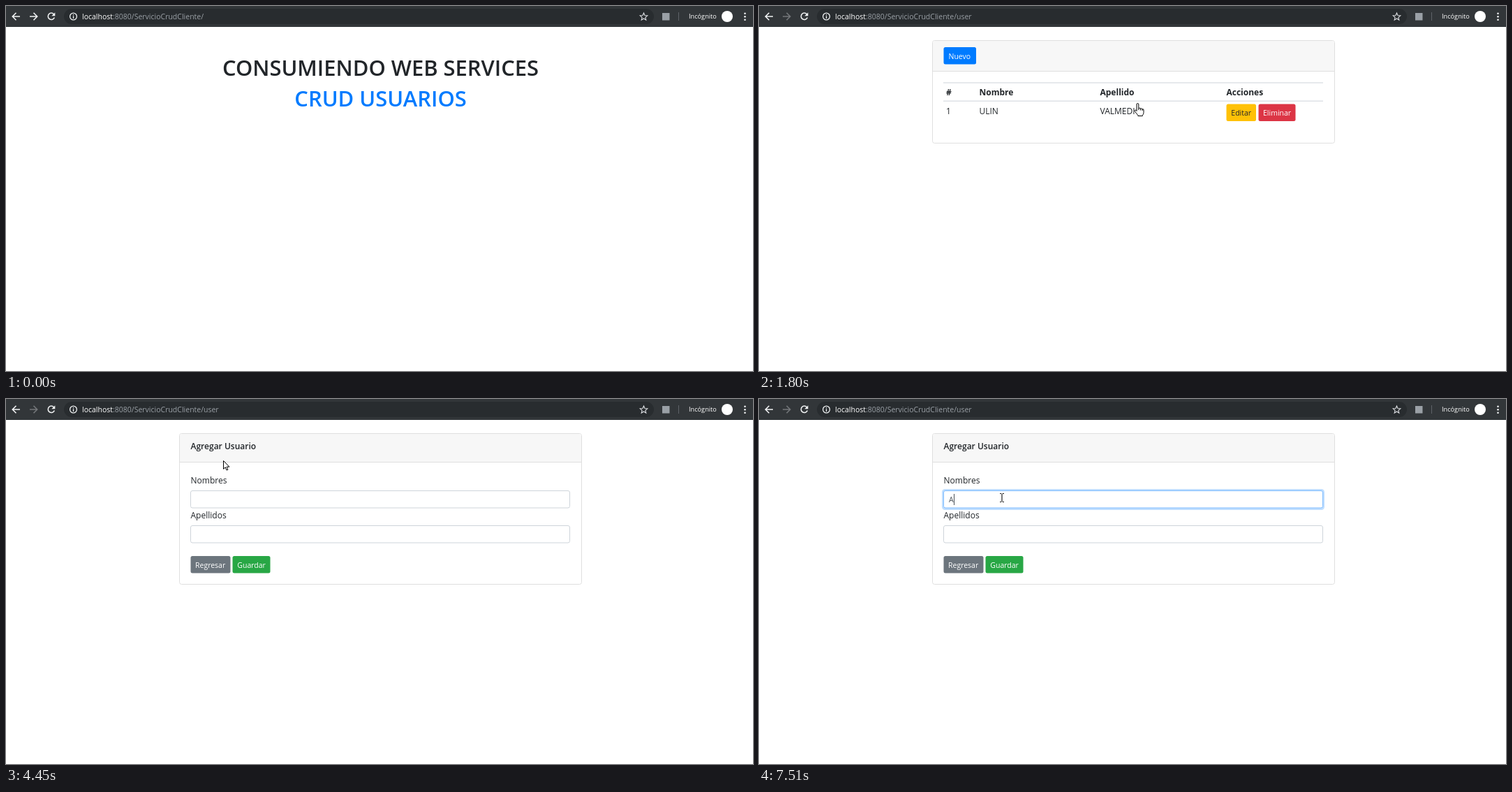
Recreate the animation shown at these times as an HTML page. Size 1070x523 px, loop 7990 ms.

```html
<!DOCTYPE html>
<html lang="es">
<head>
<meta charset="utf-8">
<title>CRUD Usuarios</title>
<style>
html, body { margin: 0; width: 100%; height: 100%; overflow: hidden; background: #fff; }
svg { display: block; width: 1070px; height: 523px; font: 12px "Open Sans", "Noto Sans", sans-serif; fill: #212529; }
.small { font-size: 10.5px; }
.h1 { font-size: 30.9px; font-weight: 600; text-anchor: middle; }
.bold { font-weight: 700; }
.white { fill: #fff; }
.icon { fill: none; stroke: #f1f3f4; stroke-width: 1.6; }
.card { fill: #fff; stroke: #dfdfdf; }
.input { fill: #fff; stroke: #ced4da; }
.cursor { fill: #fff; stroke: #000; stroke-linejoin: round; }
#link.hover { fill: #0056b3; text-decoration: underline; }
</style>
</head>
<body>
<svg viewBox="0 0 1070 523">
  <g id="home">
    <text class="h1" x="536.5" y="100">CONSUMIENDO WEB SERVICES</text>
    <text class="h1" id="link" x="536.5" y="144" fill="#007bff">CRUD USUARIOS</text>
  </g>

  <g id="list">
    <rect class="card" x="248.5" y="49.5" width="576" height="147" rx="3"/>
    <path d="M249 93V52q0-2 2-2H822q2 0 2 2V93z" fill="#f7f7f7"/>
    <path d="M249 93.5H824" stroke="#dfdfdf"/>
    <rect id="newBtn" x="264.5" y="59" width="46.5" height="24.5" rx="2.5"/>
    <text class="small white" x="271.5" y="76">Nuevo</text>
    <rect id="row" x="264" y="136" width="544" height="32" fill="#ececec"/>
    <path d="M264 110H808M264 136.3H808" stroke="#dee2e6" stroke-width="1.4"/>
    <g class="bold">
      <text x="268" y="128">#</text>
      <text x="315.5" y="128">Nombre</text>
      <text x="488.5" y="128">Apellido</text>
      <text x="669.5" y="128">Acciones</text>
    </g>
    <text x="268" y="155">1</text>
    <text x="315.5" y="155">ULIN</text>
    <text x="488.5" y="155">VALMEDI</text>
    <rect x="669.5" y="140.5" width="42.5" height="24.5" rx="2.5" fill="#ffc107"/>
    <text class="small" x="676.3" y="157">Editar</text>
    <rect x="715.5" y="140.5" width="53" height="24.5" rx="2.5" fill="#dc3545"/>
    <text class="small white" x="722" y="157">Eliminar</text>
  </g>

  <g id="form">
    <rect class="card" x="248.5" y="49.5" width="576" height="216" rx="3"/>
    <path d="M249 90V52q0-2 2-2H822q2 0 2 2V90z" fill="#f7f7f7"/>
    <path d="M249 90.5H824" stroke="#dfdfdf"/>
    <text x="264.5" y="72" font-weight="600">Agregar Usuario</text>
    <text x="264.5" y="121">Nombres</text>
    <rect id="glow" x="262" y="129" width="548" height="30" rx="4.5" fill="#bfdeff"/>
    <rect class="input" id="field" x="264.5" y="131.5" width="543" height="24.5" rx="2.5"/>
    <text class="small" id="typed" x="272" y="148" fill="#495057">A</text>
    <path id="caret" stroke="#495057"/>
    <text x="264.5" y="171">Apellidos</text>
    <rect class="input" x="264.5" y="181.5" width="543" height="24.5" rx="2.5"/>
    <rect x="264.5" y="225" width="57" height="24.5" rx="2.5" fill="#6c757d"/>
    <text class="small white" x="271" y="242">Regresar</text>
    <rect x="324.5" y="225" width="54" height="24.5" rx="2.5" fill="#28a745"/>
    <text class="small white" x="331.3" y="242">Guardar</text>
  </g>

  <g id="bar">
    <rect width="1070" height="30" fill="#323639"/>
    <rect x="83" y="4" width="845" height="22" rx="11" fill="#282c2f"/>
    <path class="icon" d="M20 15H9.5M14.5 9.8L9.3 15l5.2 5.2"/>
    <path class="icon" id="forward" d="M34 15H44.5M39.500 9.800L44.700 15l-5.200 5.200"/>
    <g id="reload">
      <path class="icon" d="M68.500 11.700A4.700 4.700 0 1 0 69.300 16.500"/>
      <path d="M70.300 9.300V14.300H65.300z" fill="#f1f3f4"/>
    </g>
    <path class="icon" id="stop" d="M60.500 10.500l9 9M69.500 10.500l-9 9"/>
    <g class="icon" stroke-width="1.300">
      <circle cx="96.500" cy="15" r="4.900" stroke-width="1.300"/>
      <path d="M96.500 14.300V18M96.500 12V13.300" stroke-width="1.300"/>
    </g>
    <text class="small white" x="109" y="19">localhost<tspan id="path" fill="#9aa0a6"></tspan></text>
    <path d="M913.500 10l1.500 3.500 3.800.3-2.900 2.500.9 3.700-3.300-2-3.300 2 .9-3.700-2.900-2.500 3.800-.3z" fill="none" stroke="#dadce0" stroke-width="1.100"/>
    <rect x="940" y="10" width="10.500" height="10.500" fill="#9aa0a6"/>
    <path d="M963.500 9V21" stroke="#5f6368"/>
    <text class="white" x="978" y="18" font-size="9.200">Incógnito</text>
    <circle class="white" cx="1033" cy="15" r="8"/>
    <g fill="#f1f3f4">
      <circle cx="1058.500" cy="10.800" r="1.300"/>
      <circle cx="1058.500" cy="15.300" r="1.300"/>
      <circle cx="1058.500" cy="19.800" r="1.300"/>
    </g>
  </g>

  <g id="pointer">
    <circle id="click" cx="-1.500" cy=".500" r="9.300" fill="#ffff00" opacity=".6"/>
    <path class="cursor" id="arrow" d="M.5.500V12.300L3.200 9.800 5 14 6.900 13.200 5.100 9.200H8.900z"/>
    <path class="cursor" id="hand" d="M0 2Q0 .5 1.400.5T2.800 2V7.500Q5 6.500 5.400 8 7.500 7.200 8 8.800 10 8.200 10 10V13.500Q10 16 8.400 17.500V18.500H1.800V17.500Q-.5 15-2.800 11.500-3 9.800-1.400 10L0 11.500zM2.800 7.500V10M5.400 8V10.500M8 8.800V11"/>
    <path id="beam" d="M-3-6H-.7M.7-6H3M-3 6H-.7M.7 6H3M0-5.500V5.500" stroke="#222" stroke-width="1.200"/>
  </g>
</svg>
<script>
const LOOP = 7990;
const $ = id => document.getElementById(id);
const show = (id, on) => { $(id).style.display = on ? "" : "none"; };
const between = (t, a, b) => t >= a && t < b;

// Pointer stops: time, x, y, shape
const stops = [
  [430, 940, 473, "arrow"], [550, 767, 332, "arrow"], [710, 757, 319, "arrow"],
  [790, 744, 306, "arrow"], [930, 672, 259, "arrow"], [1050, 622, 212, "arrow"],
  [1170, 577, 170, "arrow"], [1300, 549, 146, "hand"], [1420, 541, 139, "hand"],
  [2930, 502, 137, "arrow"], [3050, 442, 119, "arrow"], [3170, 384, 103, "arrow"],
  [3300, 336, 90, "arrow"], [3430, 306, 80, "hand"], [3550, 302, 78, "hand"],
  [4450, 311, 88, "arrow"], [4570, 328, 108, "arrow"], [4690, 340, 126, "arrow"],
  [4810, 345, 136, "beam"], [4950, 346, 138, "beam"], [5060, 347, 140.5, "beam"],
  [5560, 348, 141.5, "beam"]
];

function draw(t) {
  const home = t < 1800, form = t >= 4050, typed = t >= 7510;
  show("home", home);
  show("list", !home && !form);
  show("form", form);

  $("link").classList.toggle("hover", between(t, 1300, 1800));
  $("path").textContent = ":8080/ServicioCrudCliente/" + (home ? "" : "user");
  $("forward").style.stroke = home ? "" : "#74777a";
  const loading = between(t, 1670, 1800);
  show("stop", loading);
  show("reload", !loading);

  show("row", between(t, 2930, 3050));
  $("newBtn").style.fill = t < 3430 ? "#007bff" : t < 3940 ? "#0069d9" : "#0062cc";

  show("glow", t >= 5320);
  $("field").style.stroke = t < 5210 ? "" : t < 5320 ? "#a9cdf2" : "#80bdff";
  show("typed", typed);
  show("caret", between(t, 5210, 5690) || between(t, 6190, 6750) || t >= 7240);
  $("caret").setAttribute("d", `M${typed ? 279.5 : 272.5} 136V152`);

  const stop = stops.filter(s => s[0] <= t).pop();
  show("pointer", stop);
  if (!stop) return;
  const [, x, y, shape] = stop;
  $("pointer").setAttribute("transform", `translate(${x} ${y})`);
  for (const id of ["arrow", "hand", "beam"]) show(id, id === shape);
  show("click", between(t, 1550, 1670) || between(t, 3940, 4050) || between(t, 5210, 5320));
}

function frame() {
  draw(performance.now() % LOOP);
  requestAnimationFrame(frame);
}
frame();
</script>
</body>
</html>
```
